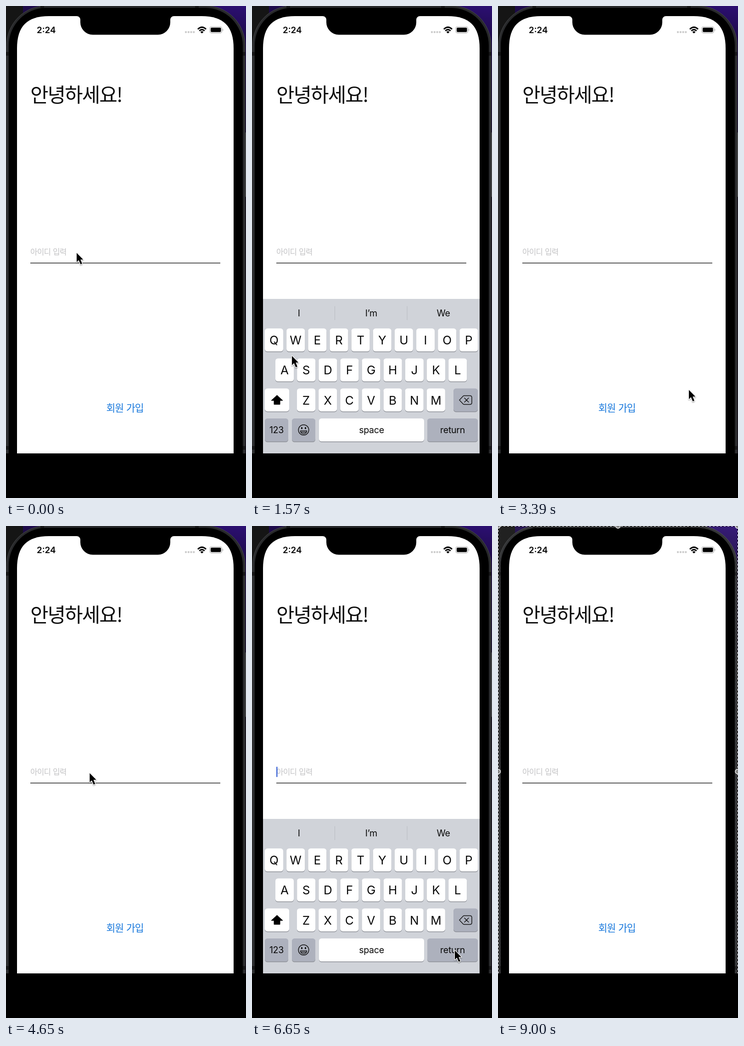
These frames come from a looping animation (523 px wide and 1070 px high, 9430 ms). An HTML page:

```html
<!DOCTYPE html>
<html lang="ko">
<head>
<meta charset="utf-8">
<style>
  html, body { margin: 0; width: 100%; height: 100%; overflow: hidden; background: #000; }
  svg { display: block; width: 100vw; height: 100vh; }
  text { font-family: Inter, Roboto, sans-serif; }
  .ko { font-family: "Noto Sans CJK KR", "Noto Sans CJK", "Noto Sans CJK JP", sans-serif; font-weight: 350; }
  #keyboard text { text-anchor: middle; fill: #080808; }
</style>
</head>
<body>
<svg viewBox="0 0 523 1070">
  <defs>
    <linearGradient id="wall">
      <stop offset="0" stop-color="#1d0b48"/>
      <stop offset="1" stop-color="#2c0f72"/>
    </linearGradient>
    <linearGradient id="fade" x2="0" y2="1">
      <stop offset="0" stop-color="#08040f" stop-opacity="0"/>
      <stop offset=".2" stop-color="#08040f" stop-opacity=".5"/>
      <stop offset="1" stop-color="#08040f"/>
    </linearGradient>
    <clipPath id="display">
      <path d="M24 973V92C24 44 46 22 94 22H426C474 22 496 44 496 92V973Z"/>
    </clipPath>
    <filter id="soft" x="-50%" y="-50%" width="200%" height="200%">
      <feDropShadow dx="0" dy="1.5" stdDeviation="1.3" flood-opacity=".4"/>
    </filter>
  </defs>

  <!-- desktop and phone body -->
  <rect width="523" height="973" fill="url(#wall)"/>
  <rect width="523" height="440" fill="url(#fade)"/>
  <rect y="440" width="523" height="533" fill="#08040f"/>
  <rect width="37" height="973" fill="#151515"/>
  <rect x="518" y="275" width="5" height="140" fill="#404143"/>
  <rect x="1.5" y="-.5" width="519.5" height="1100" rx="86" fill="#28292b" stroke="#48494b"/>
  <path d="M1 104H7M515 104H521M1 961H7M515 961H521M79 0V5M416 0V5" stroke="#161617" stroke-width="8"/>
  <rect id="glow" width="523" height="973" fill="#fff" opacity=".05"/>
  <rect x="6" y="4" width="510" height="1100" rx="82"/>

  <g clip-path="url(#display)">
    <rect x="24" y="22" width="472" height="951" fill="#fff"/>
    <path d="M150 20V22H154A8 8 0 0 1 162 30V35.500A27 27 0 0 0 189 62.500H331A27 27 0 0 0 358 35.500V30A8 8 0 0 1 366 22V20Z"/>

    <!-- status bar -->
    <text x="67" y="58.700" font-size="18.700" font-weight="600">2:24</text>
    <path d="M392 56.800h.01m5.800 0h.01m5.700 0h.01m5.700 0h.01" stroke="#ccc" stroke-width="4.400" stroke-linecap="round"/>
    <path d="M418 50.500Q427 41.800 436 50.500M421.300 54Q427 48.800 432.700 54" fill="none" stroke="#000" stroke-width="3"/>
    <path d="M423.500 56.200Q427 53.200 430.500 56.200L427 59.800Z"/>
    <rect x="444" y="45" width="26.500" height="13.800" rx="4" fill="none" stroke="#aaa" stroke-width="1.200"/>
    <rect x="446" y="47" width="22.500" height="9.800" rx="2.200"/>
    <path d="M472 49.500Q475 52 472 54.500Z" fill="#aaa"/>

    <!-- form -->
    <text class="ko" x="53" y="209" font-size="43" letter-spacing="-2" fill="#0c0c0c">안녕하세요!</text>
    <text class="ko" x="53" y="540.500" font-size="17" letter-spacing="-.9" word-spacing="1" fill="#c3c3c5">아이디 입력</text>
    <path d="M53 559H467" stroke="#202020" stroke-width="1.500"/>
    <rect id="caret" x="53" y="523.500" width="2.500" height="22.500" rx="1" fill="#4169d8"/>
    <text class="ko" x="218.500" y="882" font-size="21.500" letter-spacing="-1" word-spacing="1" fill="#1878dc">회원 가입</text>

    <g id="keyboard">
      <rect x="24" y="637" width="472" height="336" fill="#d0d3d9"/>
      <path d="M180.500 653V683M338 653V683" stroke="#b7bac1"/>
      <g id="keys"></g>
      <path d="M54.500 846.500L67 858H61V866.500H48V858H42Z" stroke="#000" stroke-linejoin="round"/>
      <g fill="none" stroke="#111" stroke-width="1.500" stroke-linejoin="round" stroke-linecap="round">
        <path d="M452 857L460 848.500Q461 847.500 462.500 847.500H475Q479 847.500 479 851.500V862.500Q479 866.500 475 866.500H462.500Q461 866.500 460 865.500ZM463 852.500L472 861.500M472 852.500L463 861.500"/>
        <circle cx="112.500" cy="922" r="11.300"/>
        <path d="M105.500 924H119.500Q118.500 930.500 112.500 930.500T105.500 924ZM107 927H118"/>
      </g>
      <ellipse cx="108.500" cy="918" rx="1.500" ry="2.200"/>
      <ellipse cx="116.500" cy="918" rx="1.500" ry="2.200"/>
    </g>
  </g>

  <rect y="973" width="523" height="97"/>

  <g id="cursor" filter="url(#soft)">
    <path d="M1 2V22L5.500 17.800L9.400 26.800L13 25.200L9.200 16.500H15.300Z" stroke="#fff" stroke-width="2.400" paint-order="stroke" stroke-linejoin="round"/>
  </g>

  <g id="selection">
    <path d="M.5 973V.5H522.500V973" fill="none" stroke="#000"/>
    <path d="M.5 973V.5H522.500V973" fill="none" stroke="#fff" stroke-dasharray="4 4"/>
    <g id="handles" fill="#858585" stroke="#fff" stroke-width="1.300"></g>
  </g>
</svg>

<script>
const LOOP = 9430;
const KEYBOARD_HEIGHT = 336;
const SELECTION_START = 8910;
const $ = id => document.getElementById(id);

// Periods during which the text field has focus
const focusPeriods = [[1000, 2850], [5190, 6690]];

// Pointer stops: time, x, y
const pointerStops = [
  [0, 153, 535], [1100, 153, 535], [1570, 86, 759], [1880, 140, 752],
  [2570, 418, 739], [2780, 441, 921], [2910, 441, 921], [3390, 415, 833],
  [3830, 378, 805], [4740, 176, 528], [5350, 171, 521], [5700, 173, 526],
  [6480, 441, 921], [6760, 441, 921], [7130, 426, 845], [7960, 426, 845],
  [8220, 530, -30], [LOOP, 530, -30]
];

function svg(parent, tag, attributes, content = '') {
  const node = document.createElementNS('http://www.w3.org/2000/svg', tag);
  for (const name in attributes) node.setAttribute(name, attributes[name]);
  node.textContent = content;
  parent.append(node);
}

function label(text, x, y, size) {
  const spacing = text.length > 1 ? -0.3 : 0;
  svg($('keys'), 'text',
    { x, y: y + size * 0.36, 'font-size': size, 'letter-spacing': spacing }, text);
}

function key(text, x, y, width, fill = '#fff', size = 19.600) {
  const box = { x, width, height: 50, rx: 5.5 };
  svg($('keys'), 'rect', { ...box, y: y + 1.5, fill: '#8d9097' });
  svg($('keys'), 'rect', { ...box, y, fill });
  label(text, x + width / 2, y + (size > 20 ? 25.500 : 24.500), size);
}

function buildKeyboard() {
  const gray = '#adb1bd';
  ['I', 'I’m', 'We'].forEach((word, i) => label(word, 102.500 + i * 157.300, 668, 19.600));
  [['QWERTYUIOP', 28, 701.300], ['ASDFGHJKL', 51, 766.500], ['ZXCVBNM', 98, 831.700]]
    .forEach(([letters, x, y]) =>
      [...letters].forEach((letter, i) => key(letter, x + i * 47.150, y, 40, '#fff', 26)));
  key('', 28, 831.700, 53);
  key('', 439, 831.700, 53, gray);
  key('123', 28, 897, 51, gray);
  key('', 87, 897, 51, gray);
  key('space', 146, 897, 229);
  key('return', 382, 897, 110, gray);
}

// Critically damped spring from 0 to 1
function spring(ms) {
  const x = Math.max(0, ms) * 0.018;
  const value = 1 - (1 + x) * Math.exp(-x);
  return value > 0.997 ? 1 : value;
}

function pointerAt(time) {
  const next = pointerStops.findIndex(stop => stop[0] > time);
  const [t0, x0, y0] = pointerStops[next - 1];
  const [t1, x1, y1] = pointerStops[next];
  const p = (time - t0) / (t1 - t0);
  const ease = p * p * (3 - 2 * p);
  return [x0 + (x1 - x0) * ease, y0 + (y1 - y0) * ease];
}

const show = (id, visible) => { $(id).style.display = visible ? '' : 'none'; };

function draw(time) {
  const raised = focusPeriods.reduce(
    (sum, [start, end]) => sum + spring(time - start) - spring(time - end), 0);
  $('keyboard').setAttribute('transform', `translate(0 ${KEYBOARD_HEIGHT * (1 - raised)})`);
  show('caret', focusPeriods.some(
    ([start, end]) => time >= start && time < end && (time - start) % 1000 < 500));
  $('cursor').setAttribute('transform', `translate(${pointerAt(time)})`);
  show('cursor', time < 8220);
  show('selection', time >= SELECTION_START);
  show('glow', time >= SELECTION_START);
}

buildKeyboard();
[[0, 0], [261.500, 0], [522, 0], [0.500, 534], [522, 534]]
  .forEach(([cx, cy]) => svg($('handles'), 'circle', { cx, cy, r: 5 }));

const startTime = performance.now();
function tick() {
  draw((performance.now() - startTime) % LOOP);
  requestAnimationFrame(tick);
}
tick();
</script>
</body>
</html>
```
